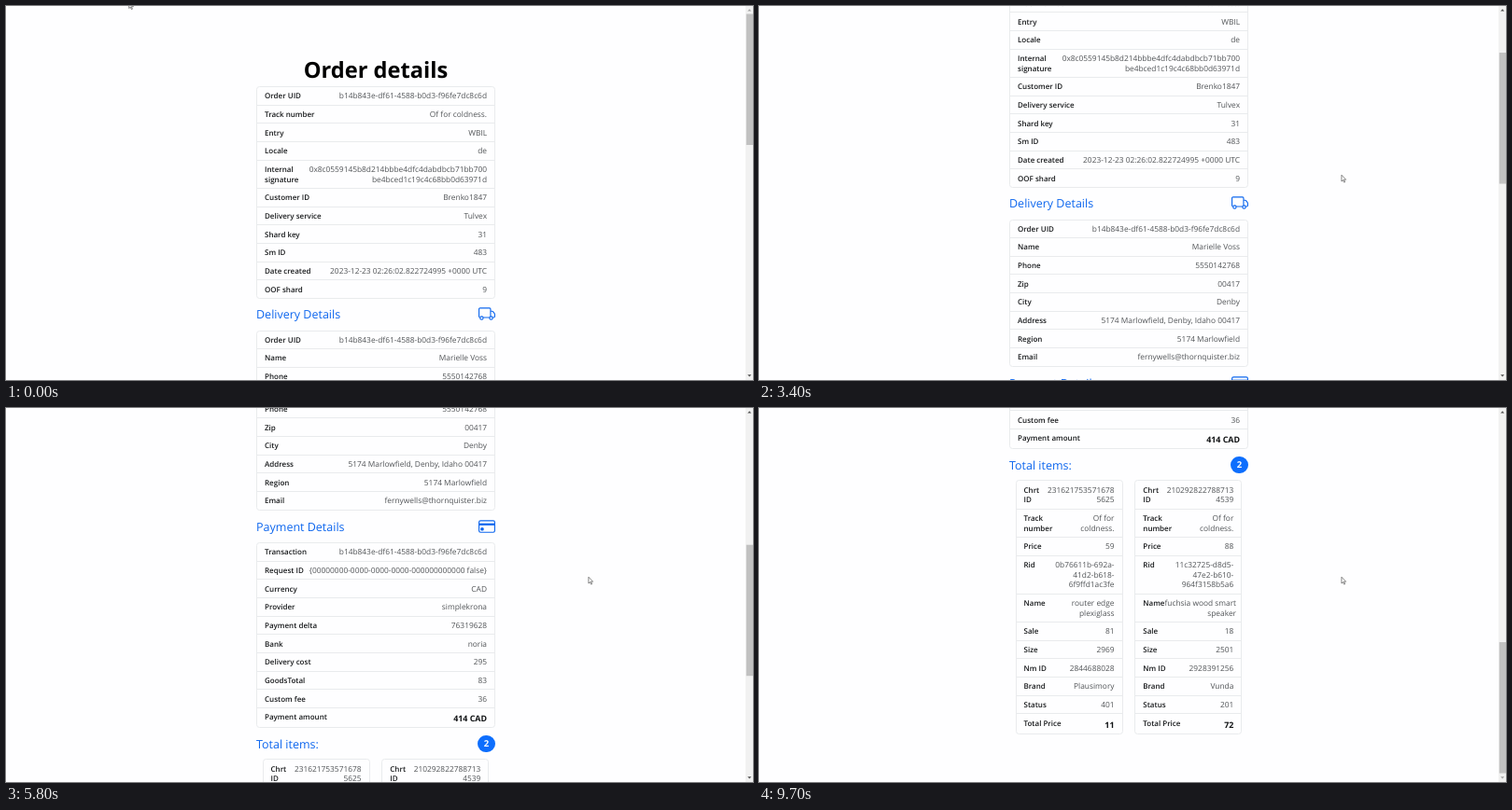
Recreate the animation shown at these times as an HTML page. Size 800 by 401 pixels, loop 10000 ms.

```html
<!DOCTYPE html>
<html lang="en">
<head>
<meta charset="utf-8">
<title>Order details</title>
<style>
html, body { margin: 0; width: 100%; height: 100%; overflow: hidden; background: #fefeff; }
body { position: relative; font: 8.35px/10.7px "Open Sans", "Noto Sans", sans-serif; text-rendering: geometricPrecision; }
#page { position: absolute; left: 0; top: 0; width: 792px; height: 1096px; }
h1, h2, .card, .badge, #page svg, #bar, #cursor { position: absolute; margin: 0; }
h1 { left: 268px; top: 52.5px; width: 256px; font: bold 23.65px/30px "Open Sans", sans-serif; text-align: center; color: #000; }
h2 { left: 268px; font: 500 12.5px/20px "Open Sans", sans-serif; color: #0d66ee; white-space: pre; }
.card { box-sizing: border-box; border: 1px solid #e9ebed; border-radius: 3.5px; }
.row { display: flex; justify-content: space-between; padding: 5.3px 8px 2.66px; border-bottom: 1px solid #e9ebed; white-space: pre; }
.row:last-child { border: 0; }
.row b { font-weight: 600; font-size: 8px; color: #181a1c; }
.row span { color: #515457; text-align: right; }
.row.sum span { font-weight: bold; font-size: 8.9px; line-height: 12.4px; color: #101214; }
.badge { left: 505.3px; top: 747.2px; width: 18.4px; height: 17.6px; border-radius: 9px; background: #0d6efd; color: #fff; font-weight: bold; font-size: 9.5px; line-height: 17.6px; text-align: center; }
#page svg { left: 506px; width: 18px; height: 18px; fill: none; stroke: #0d66ee; }
#bar { right: 0; top: 0; }
#cursor { left: 0; top: 0; }
</style>
</head>
<body>
<div id="page">
  <h1>Order details</h1>
  <h2 style="top:321px">Delivery Details</h2>
  <svg viewBox="0 0 16 16" style="top:321.4px">
    <path d="M1.5 11.5a1 1 0 0 1-1-1v-7a1 1 0 0 1 1-1h9a1 1 0 0 1 1 1v7M4.5 11.5h6M11.5 5.5h1.5a1 1 0 0 1 .8.4l1.4 1.8a1 1 0 0 1 .3.7v2.1a1 1 0 0 1-1 1h-1"/>
    <circle cx="3" cy="12" r="1.5"/><circle cx="12" cy="12" r="1.5"/>
  </svg>
  <h2 style="top:513.5px">Payment Details</h2>
  <svg viewBox="0 0 16 16" style="top:514.2px">
    <rect x=".5" y="2.5" width="15" height="11" rx="1.5"/>
    <path d="M0 6h16" stroke-width="2"/>
    <rect x="2.5" y="9.5" width="2" height="2" rx=".5" fill="#0d66ee"/>
  </svg>
  <h2 style="top:746.5px">Total items:</h2>
  <div class="badge">2</div>
</div>
<svg id="bar" width="8" height="401">
  <rect width="8" height="401" fill="#f1f1f1"/>
  <rect id="thumb" x=".8" width="7.2" height="140.5" fill="#c1c1c1"/>
  <path id="up" d="M2.2 5.4L4.2 3.2L6.2 5.4z"/>
  <path id="down" d="M2.2 395.2L4.2 397.4L6.2 395.2z"/>
</svg>
<svg id="cursor" width="8" height="12" viewBox="-1 -1 8 12">
  <path d="M.2 .2V7L1.8 5.6L2.9 8.1L3.9 7.7L2.8 5.2H4.9z" fill="#fff" stroke="#555" stroke-width=".7"/>
</svg>
<script>
const $ = id => document.getElementById(id);
const uid = "b14b843e-df61-4588-b0d3-f96fe7dc8c6d";

function card(x, y, w, rows, sum) {
  const el = document.createElement("div");
  el.className = "card";
  el.style.cssText = `left:${x}px;top:${y}px;width:${w}px`;
  el.innerHTML = rows.map(([name, value], i) =>
    `<div class="row${sum && i === rows.length - 1 ? " sum" : ""}"><b>${name}</b><span>${value}</span></div>`).join("");
  $("page").append(el);
}

card(268, 86, 256, [
  ["Order UID", uid],
  ["Track number", "Of for coldness."],
  ["Entry", "WBIL"],
  ["Locale", "de"],
  ["Internal\nsignature", "0x8c0559145b8d214bbbe4dfc4dabdbcb71bb700\nbe4bced1c19c4c68bb0d63971d"],
  ["Customer ID", "Brenko1847"],
  ["Delivery service", "Tulvex"],
  ["Shard key", "31"],
  ["Sm ID", "483"],
  ["Date created", "2023-12-23 02:26:02.822724995 +0000 UTC"],
  ["OOF shard", "9"]
]);
card(268, 347.5, 256, [
  ["Order UID", uid],
  ["Name", "Marielle Voss"],
  ["Phone", "5550142768"],
  ["Zip", "00417"],
  ["City", "Denby"],
  ["Address", "5174 Marlowfield, Denby, Idaho 00417"],
  ["Region", "5174 Marlowfield"],
  ["Email", "fernywells@thornquister.biz"]
]);
card(268, 540, 256, [
  ["Transaction", uid],
  ["Request ID", "{00000000-0000-0000-0000-000000000000 false}"],
  ["Currency", "CAD"],
  ["Provider", "simplekrona"],
  ["Payment delta", "76319628"],
  ["Bank", "noria"],
  ["Delivery cost", "295"],
  ["GoodsTotal", "83"],
  ["Custom fee", "36"],
  ["Payment amount", "414 CAD"]
], true);

const fields = ["Chrt\nID", "Track\nnumber", "Price", "Rid", "Name", "Sale", "Size", "Nm ID", "Brand", "Status", "Total Price"];
const item = (x, values) => card(x, 772.3, 115, fields.map((f, i) => [f, values[i]]), true);
item(274.5, ["231621753571678\n5625", "Of for\ncoldness.", "59", "0b76611b-692a-\n41d2-b618-\n6f9ffd1ac3fe",
  "router edge\nplexiglass", "81", "2969", "2844688028", "Plausimory", "401", "11"]);
item(402.3, ["210292822788713\n4539", "Of for\ncoldness.", "88", "11c32725-d8d5-\n47e2-b610-\n964f3158b5a6",
  "fuchsia wood smart\nspeaker", "18", "2501", "2928391256", "Vunda", "201", "72"]);

// Monotone cubic curve through [time, value] points
function curve(points) {
  const slope = points.slice(1).map(([t, v], i) => (v - points[i][1]) / (t - points[i][0]));
  const tangent = points.map((_, i) => {
    const a = slope[i - 1] ?? slope[0], b = slope[i] ?? 0;
    return a * b > 0 ? 2 * a * b / (a + b) : 0;
  });
  return t => {
    const i = points.findIndex(p => p[0] > t) - 1;
    if (i === -2) return points[points.length - 1][1];
    if (i < 0) return points[0][1];
    const [t0, v0] = points[i], [t1, v1] = points[i + 1];
    const d = t1 - t0, u = (t - t0) / d, w = 1 - u;
    return v0 * w * w * (1 + 2 * u) + v1 * u * u * (1 + 2 * w)
      + d * u * w * (tangent[i] * w - tangent[i + 1] * u);
  };
}

const scrollAt = curve([[1800, 0], [2000, 7], [3400, 119], [4300, 231.5], [5800, 396], [7100, 510.5], [8450, 645], [8600, 645], [9100, 695]]);
const cursorX = curve([[0, 131.5], [100, 203], [300, 533], [600, 623.7]]);
const cursorY = curve([[0, -4.5], [100, 93], [300, 143], [600, 181]]);

function draw(now) {
  const t = Math.floor(now % 10000 / 100) * 100;
  const s = scrollAt(t);
  $("page").style.transform = `translateY(${-s}px)`;
  $("thumb").setAttribute("y", 8.5 + s * 0.349);
  $("up").setAttribute("fill", s > 0 ? "#505050" : "#a3a3a3");
  $("down").setAttribute("fill", s < 695 ? "#505050" : "#a3a3a3");
  $("cursor").style.transform = `translate(${cursorX(t) - 1}px, ${cursorY(t) - 1}px)`;
}

const start = performance.now();
function loop() {
  draw(performance.now() - start);
  requestAnimationFrame(loop);
}
loop();
</script>
</body>
</html>
```
